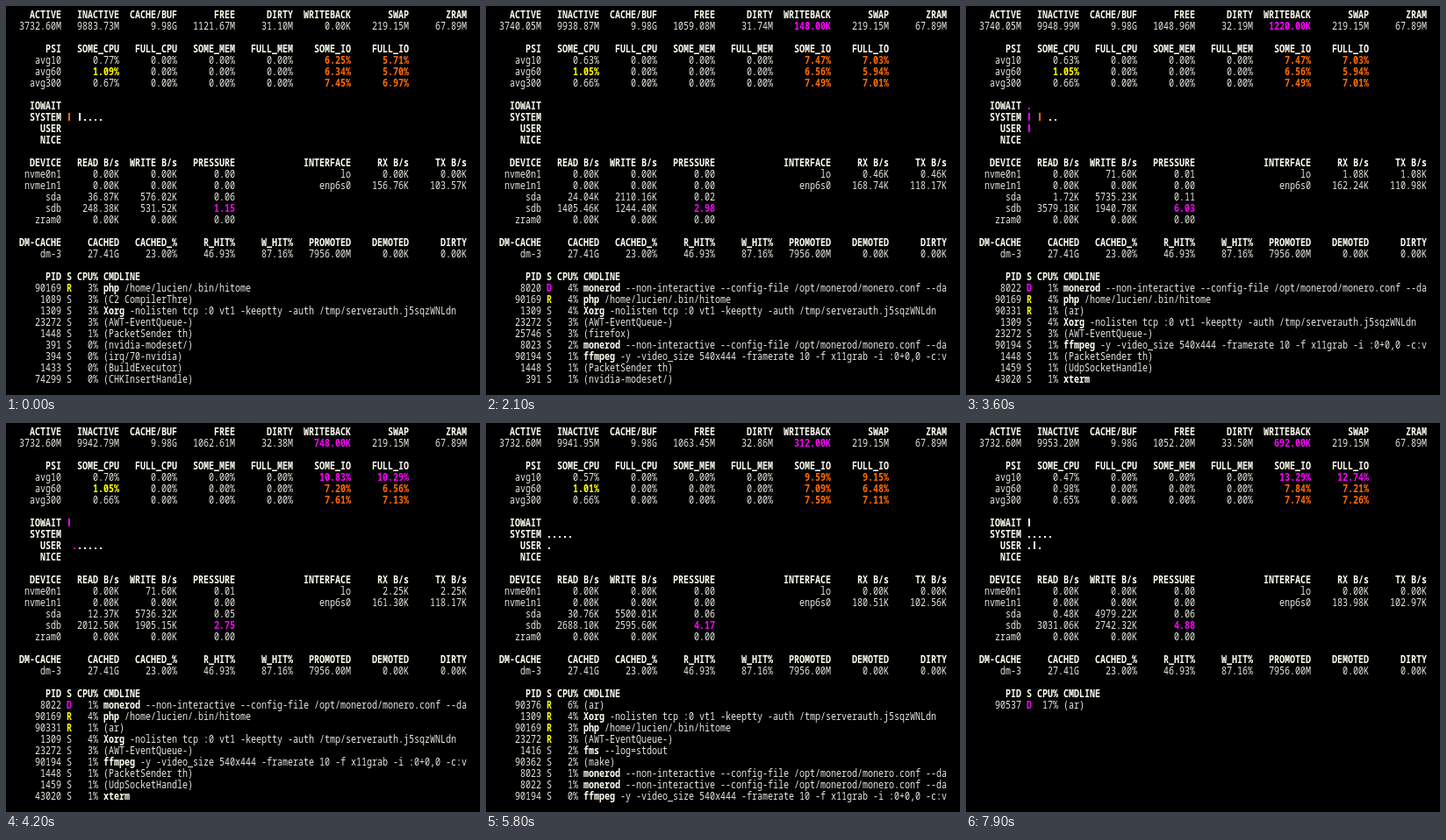
An HTML page with a canvas that plays this animation: 540 by 444 pixels, repeating every 8 s.

```html
<!DOCTYPE html>
<html lang="en">
<head>
<meta charset="utf-8">
<title>System monitor</title>
<style>
html, body { margin: 0; width: 100%; height: 100%; overflow: hidden; background: #000; }
canvas { display: block; }
</style>
</head>
<body>
<canvas id="screen" width="540" height="444"></canvas>
<script>
const ctx = document.getElementById('screen').getContext('2d');
const CELL = 6, LINE = 13, LEFT = 3, BASE = 14, CAP = 9, TALL = 1.25;
const FONT = '10px "Noto Sans Mono", "DejaVu Sans Mono", monospace';
const PLAIN = '#e8e8e0', BRIGHT = '#fffff0';
const HUES = { m: '#f0f', o: '#ff6c00', y: '#ff0' };

// Each process: pid, state and load in each 2 s listing, command.
const MONERO = 'monerod --non-interactive --config-file /opt/monerod/monero.conf --da';
const PROCESSES = `
90169 R3,R4,R4,R3,R4 php /home/lucien/.bin/hitome
1089 S3 (C2 CompilerThre)
1309 S3,S4,S4,R4,S5 Xorg -nolisten tcp :0 vt1 -keeptty -auth /tmp/serverauth.j5sqzWNLdn
23272 S3,S3,S3,R3,S4 (AWT-EventQueue-)
25746 ,S3,,,S2 (firefox)
90194 ,S1,S1,S0 ffmpeg -y -video_size 540x444 -framerate 10 -f x11grab -i :0+0,0 -c:v
1448 S1,S1,S1 (PacketSender th)
391 S0,S1 (nvidia-modeset/)
394 S0 (irq/70-nvidia)
1433 S0 (BuildExecutor)
74299 S0 (CHKInsertHandle)
8020 ,D4 ${MONERO}
8023 ,S2,,S1,D5 ${MONERO}
8022 ,,D1,S1 ${MONERO}
90331 ,,R1 (ar)
1459 ,,S1 (UdpSocketHandle)
43020 ,,S1 xterm
90376 ,,,R6 (ar)
1416 ,,,S2 fms --log=stdout
90362 ,,,S2 (make)
90537 ,,,,D17 (ar)
71763 ,,,,D4 (kworker/u64:0+btrfs-delalloc)
90317 ,,,,D0 (kworker/14:2+dm-cache)
25934 ,,,,S1 (WebExtensions)`.trim().split('\n').map(line => {
  const [pid, history, name, ...args] = line.split(' ');
  return { pid, history: history.split(','), name, args: args.join(' ') };
});

function rnd(seed) {
  const v = Math.sin(seed * 12.9898) * 43758.5453;
  return v - Math.floor(v);
}

const mix = (a, b, p) => a + (b - a) * p;
const during = (tick, from, to) => tick >= from && tick < to;
const num = (v, unit = '') => v.toFixed(2) + unit;
const level = v => v > 10 ? 'm' : v > 5 ? 'o' : v > 1 ? 'y' : '';

// Linear path through [tick, value] points.
function path(tick, ...points) {
  const i = Math.max(1, points.findIndex(p => p[0] >= tick));
  const [t0, v0] = points[i - 1], [t1, v1] = points[i];
  return mix(v0, v1, (tick - t0) / (t1 - t0));
}

function put(col, row, text, hue, bold = !!hue) {
  ctx.font = (bold ? 'bold ' : '') + FONT;
  ctx.fillStyle = HUES[hue] || (bold ? BRIGHT : PLAIN);
  ctx.fillText(text, LEFT + col * CELL, (BASE + row * LINE) / TALL);
}

// Right-aligned entry in one of eight 11-character columns.
function cell(i, row, text, hue, bold) {
  put(10 + 11 * i - text.length, row, text, hue, bold);
}

function heads(row, names, first = 0) {
  names.split('|').forEach((name, i) => cell(first + i, row, name, '', true));
}

// Meter mark, as tall as a capital or a dot on the baseline.
function mark(col, row, ch, hue) {
  if (ch === 'X') return put(col, row, ch, hue, true);
  const high = { '|': CAP, '.': 2, ' ': 0 }[ch];
  ctx.fillStyle = HUES[hue] || BRIGHT;
  ctx.fillRect(LEFT + col * CELL + 2, (BASE + row * LINE - high) / TALL, 2, high / TALL);
}

function drawMemory(tick) {
  const active = 3732.6 + (during(tick, 20, 42) ? 7.45 : 0);
  const inactive = path(tick, [0, 9883.73], [28, 9957.25], [48, 9936.59], [79, 9953.2]);
  const free = 14738 - active - inactive;
  const dirty = mix(31.1, 33.5, tick / 79);
  const flush = path(tick, [0, 0], [20, 0], [28, 1192], [36, 1220], [48, 272], [68, 348], [79, 692]);
  const back = Math.round(flush / 4) * 4;
  heads(0, 'ACTIVE|INACTIVE|CACHE/BUF|FREE|DIRTY|WRITEBACK|SWAP|ZRAM');
  [num(active, 'M'), num(inactive, 'M'), '9.98G', num(free, 'M'), num(dirty, 'M'),
    num(back, 'K'), '219.15M', '67.89M']
    .forEach((text, i) => cell(i, 1, text, i === 5 && back ? 'm' : ''));
}

// Running average that takes in one stall sample every 2 s.
function stall(start, span, samples) {
  const keep = Math.exp(-2 / span);
  const avg = samples.reduce((a, s) => mix(s, a, keep), start);
  return Math.floor(avg * 100) / 100;
}

function drawPressure(tick) {
  heads(3, 'PSI|SOME_CPU|FULL_CPU|SOME_MEM|FULL_MEM|SOME_IO|FULL_IO');
  const epoch = Math.floor((tick + 2.5) / 20);
  const cpu = [0, 1, 0, 0], some = [13, 26, 4, 30], full = [13, 25, 4, 29];
  [[10, .777, 6.255, 5.7135], [60, 1.0901, 6.345, 5.701], [300, .6701, 7.458, 6.979]]
    .forEach(([span, cpu0, some0, full0], r) => {
      const avg = (start, samples) => stall(start, span, samples.slice(0, epoch));
      cell(0, 4 + r, 'avg' + span);
      [avg(cpu0, cpu), 0, 0, 0, avg(some0, some), avg(full0, full)]
        .forEach((v, i) => cell(i + 1, 4 + r, num(v, '%'), level(v)));
    });
}

// One mark per core; the busiest cores come first and are tinted.
function drawMeters(tick) {
  const hues = tick < 10 ? 'o' : 'mmoo'.slice(0, rnd(tick + 5) * 4);
  [['IOWAIT', 4], ['SYSTEM', 8], ['USER', 8], ['NICE', 0]].forEach(([name, most], r) => {
    cell(0, 8 + r, name, '', true);
    const cores = Math.floor(rnd(tick * 3 + r) * most);
    for (let i = 0; i < cores; i++) {
      const load = rnd(tick * 31 + r * 11 + i);
      const ch = load > .95 && r === 0 ? 'X' : load > .6 && i < 4 - r ? '|' : load > .2 ? '.' : ' ';
      mark(11 + i, 8 + r, ch, hues[i]);
    }
  });
}

function drawDevices(tick) {
  const busy = Math.min(1, Math.max(0, (tick - 13) / 23));
  const sway = (seed, by) => mix(1 - by, 1 + by, rnd(tick * 7 + seed));
  const load = mix(1.1, 4.4, busy) * sway(3, .4);
  const nvme = during(tick, 32, 56);
  const lo = during(tick, 46, 50) ? 183.8 : rnd(tick) < .4 ? 0 : 1.4 * sway(5, .8);
  heads(13, 'DEVICE|READ B/s|WRITE B/s|PRESSURE');
  [['nvme0n1', 0, nvme ? 71.6 : 0, nvme ? .01 : 0],
    ['nvme1n1', 0, 0, 0],
    ['sda', 20 * sway(1, 1), mix(700, 4800, busy) * sway(2, .2), .07 * sway(4, .8)],
    ['sdb', mix(240, 2800, busy) * sway(3, .3), mix(500, 2300, busy) * sway(6, .25), load],
    ['zram0', during(tick, 66, 70) ? 7.93 : 0, 0, 0]
  ].forEach(([name, read, write, wait], r) => {
    cell(0, 14 + r, name);
    cell(1, 14 + r, num(read, 'K'));
    cell(2, 14 + r, num(write, 'K'));
    cell(3, 14 + r, num(wait), wait > 1 ? 'm' : '');
  });
  heads(13, 'INTERFACE|RX B/s|TX B/s', 5);
  [['lo', lo, lo], ['enp6s0', 168 * sway(7, .1), 108 * sway(8, .12)]].forEach(([name, rx, tx], r) => {
    cell(5, 14 + r, name);
    cell(6, 14 + r, num(rx, 'K'));
    cell(7, 14 + r, num(tx, 'K'));
  });
  heads(20, 'DM-CACHE|CACHED|CACHED_%|R_HIT%|W_HIT%|PROMOTED|DEMOTED|DIRTY');
  'dm-3 27.41G 23.00% 46.93% 87.16% 7956.00M 0.00K 0.00K'.split(' ')
    .forEach((text, i) => cell(i, 21, text));
}

// Listed by state (D, R, S), then by load.
function drawTasks(tick, shown) {
  cell(0, 23, 'PID', '', true);
  put(11, 23, 'S CPU% CMDLINE', '', true);
  const view = Math.floor((tick + 15) / 20);
  PROCESSES.filter(p => p.history[view])
    .map(p => ({ ...p, state: p.history[view][0], cpu: +p.history[view].slice(1) }))
    .sort((a, b) => a.state.localeCompare(b.state) || b.cpu - a.cpu)
    .slice(0, shown)
    .forEach(({ pid, state, cpu, name, args }, r) => {
      const row = 24 + r, load = cpu + '%';
      cell(0, row, pid);
      put(11, row, state, { R: 'y', D: 'm' }[state]);
      put(17 - load.length, row, load);
      put(18, row, name, '', name[0] !== '(');
      put(19 + name.length, row, args);
    });
}

function draw(tick) {
  ctx.setTransform(1, 0, 0, 1, 0, 0);
  ctx.fillStyle = '#000';
  ctx.fillRect(0, 0, 540, 444);
  if (tick % 9 === 8) return; // cleared, not yet rewritten
  ctx.scale(1, TALL);
  drawMemory(tick);
  drawPressure(tick);
  drawMeters(tick);
  drawDevices(tick);
  drawTasks(tick, tick === 79 ? 1 : 9); // the last refresh is caught half-way
}

let last = -1;
const start = performance.now();
function loop() {
  const tick = Math.floor((performance.now() - start) % 8000 / 100);
  if (tick !== last) draw(last = tick);
  requestAnimationFrame(loop);
}
loop();
</script>
</body>
</html>
```
